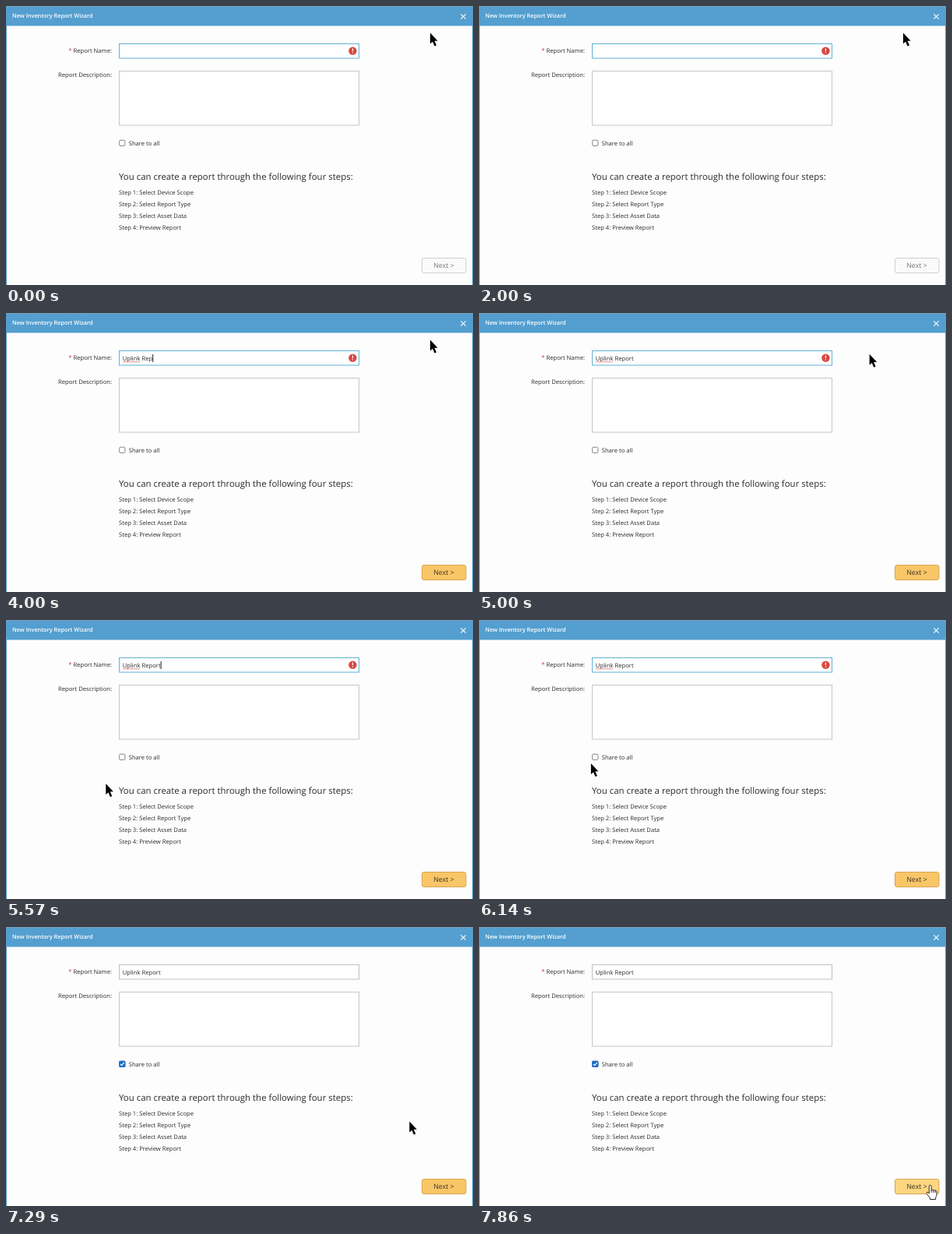
These frames come from a looping animation (600 by 358 pixels, 8000 ms). An HTML page:

```html
<!DOCTYPE html>
<html lang="en">
<head>
<meta charset="utf-8">
<title>Report Wizard</title>
<style>
  html, body { margin: 0; width: 100%; height: 100%; overflow: hidden; background: #fdfdfe; }
  svg { display: block; width: 600px; height: 358px; }
  text {
    font: 7.65px "Open Sans", "Noto Sans", sans-serif;
    fill: #2b2b2b; white-space: pre; text-rendering: geometricPrecision;
  }
  .title { font-size: 7.3px; font-weight: 600; fill: #fff; }
  .lead { font-size: 11.45px; }
  .end { text-anchor: end; }
  .next { font-size: 8.9px; text-anchor: middle; }
  .box { fill: #fff; stroke: #c6c6c8; }

  #name { stroke: #bfc0c2; }
  .focus #name { stroke: #62b1d3; }
  .blur #name { stroke: #a9b8c0; }

  #button rect { fill: #fafafa; stroke: #cfcfcf; }
  #button text { fill: #777; }
  .ready #button rect { fill: #f9c667; stroke: #d8a751; }
  .ready #button text { fill: #3a3428; }
  .hover #button rect { fill: #fcd680; }

  #error, #caret, #wave, #tick, #hand { visibility: hidden; }
  .focus #error, .caret #caret, .wave #wave, .checked #tick, .hover #hand { visibility: visible; }
  .hover #arrow { visibility: hidden; }
</style>
</head>
<body>
<svg id="stage" viewBox="0 0 600 358">
  <rect width="600" height="358" fill="#fdfdfe"/>
  <rect width="600" height="25.5" fill="#549fd0"/>
  <rect width="600" height="1" fill="#7d9fb6"/>
  <path d="M.5 25V358M599.5 25V358" stroke="#549fd0"/>
  <text class="title" x="8" y="15.3">New Inventory Report Wizard</text>
  <path d="M584.3 10.3l6.4 6.4m0-6.4l-6.4 6.4" stroke="#fff" stroke-width="1.1"/>

  <text x="80.3" y="60" style="fill:#d9302c">*</text>
  <text class="end" x="136" y="59.6">Report Name:</text>
  <text class="end" x="136" y="91">Report Description:</text>

  <rect id="name" class="box" x="145.5" y="48.5" width="308" height="18.5"/>
  <rect class="box" x="145.5" y="83.5" width="308" height="69.5"/>
  <text id="typed" x="149.7" y="60.5"></text>
  <path id="wave" fill="none" stroke="#e0514c" stroke-width=".7"/>
  <rect id="caret" y="53" width="1" height="10" fill="#222"/>
  <g id="error">
    <circle cx="445.4" cy="57.6" r="5.2" fill="#d8463f"/>
    <path d="M445.4 54.4v3.7m0 1.2v1.3" stroke="#fff" stroke-width="1.3"/>
  </g>

  <rect x="145.7" y="172.2" width="7.2" height="7.2" rx="1.2" fill="#fff" stroke="#777" stroke-width=".9"/>
  <g id="tick">
    <rect x="145.2" y="171.7" width="8.2" height="8.2" rx="1.4" fill="#1a6fca"/>
    <path d="M146.9 175.9l1.7 1.8l3.2-3.9" fill="none" stroke="#fff" stroke-width="1.2"/>
  </g>
  <text x="157.7" y="179">Share to all</text>

  <text class="lead" x="145" y="223">You can create a report through the following four steps:</text>
  <text x="145" y="241.7">Step 1: Select Device Scope</text>
  <text x="145" y="256.9">Step 2: Select Report Type</text>
  <text x="145" y="272">Step 3: Select Asset Data</text>
  <text x="145" y="287.2">Step 4: Preview Report</text>

  <g id="button">
    <rect x="534.5" y="323.5" width="56.5" height="19" rx="2.5"/>
    <text class="next" x="562.5" y="336.3">Next &gt;</text>
  </g>

  <g id="pointer">
    <path id="arrow" d="M0 0V14L3.1 11.2L5.6 17L8 16L5.5 10.3H9.6Z"
      stroke="#fff" stroke-width=".8" paint-order="stroke"/>
    <path id="hand" d="M-1.4 1.2a1.4 1.4 0 0 1 2.8 0V6q1.3-.9 2.5.3q1.5-.7 2.4.5q1.7-.3 2 1.2V12q0 2-1.3 3.6V18H-.2V16.4L-4.2 11q-1-1.6.2-2.2q1-.4 2.6 1.6Z
      M1.4 6v3.2M3.9 6.4v3M6.3 6.9v2.6" fill="#fff" stroke="#111" stroke-width=".9" stroke-linejoin="round"/>
  </g>
</svg>
<script>
  const LOOP = 8000, STEP = 1000 / 7;
  const TEXT = "Uplink Report";
  // [step, letters typed]
  const TYPING = [[0, 0], [15, 1], [17, 2], [19, 3], [20, 4], [21, 5], [23, 6],
    [24, 7], [25, 8], [27, 9], [28, 10], [29, 11], [30, 13]];
  // [step, caret shown]
  const BLINK = [[0, 0], [3, 1], [6, 0], [10, 1], [14, 0], [15, 1], [34, 0], [37, 1], [41, 0]];
  // [step, x, y]
  const PATH = [[34, 545, 34.5], [39, 128.3, 210], [41, 128.3, 210], [44, 149.3, 174.8],
    [46, 149.3, 174.8], [49, 485, 205], [54, 579.7, 331.5]];
  const WAVE = 24, READY = 15, CLICK = 45, SETTLED = 50;

  const $ = id => document.getElementById(id);
  const stage = $("stage"), typed = $("typed"), caret = $("caret"), pointer = $("pointer");
  $("wave").setAttribute("d", "M150 62.2" + "l1 1l1-1".repeat(11));

  const held = (keys, n) => keys.filter(k => k[0] <= n).pop()[1];
  const ease = p => p * p * (3 - 2 * p);

  function place(n) {
    const i = PATH.findIndex(k => k[0] > n);
    if (i === 0) return PATH[0].slice(1);
    if (i < 0) return PATH[PATH.length - 1].slice(1);
    const [a, x, y] = PATH[i - 1], [b, u, v] = PATH[i];
    const p = ease((n - a) / (b - a));
    return [x + (u - x) * p, y + (v - y) * p];
  }

  function draw(time) {
    // The screen refreshes seven times a second.
    const n = Math.floor((time % LOOP + 5) / STEP) % 56;
    const [x, y] = place(n);
    const text = TEXT.slice(0, held(TYPING, n));
    if (typed.textContent !== text) typed.textContent = text;
    const width = text ? typed.getComputedTextLength() : 0;
    caret.setAttribute("x", 149.7 + width);
    pointer.setAttribute("transform", `translate(${x} ${y})`);

    const states = {
      focus: n < CLICK,
      blur: n >= CLICK && n < SETTLED,
      caret: held(BLINK, n),
      wave: n >= WAVE && n < CLICK,
      checked: n >= CLICK,
      ready: n >= READY,
      hover: x > 534 && y > 323
    };
    stage.setAttribute("class", Object.keys(states).filter(k => states[k]).join(" "));
  }

  const start = performance.now();
  function frame() {
    draw(performance.now() - start);
    requestAnimationFrame(frame);
  }
  frame();
</script>
</body>
</html>
```
